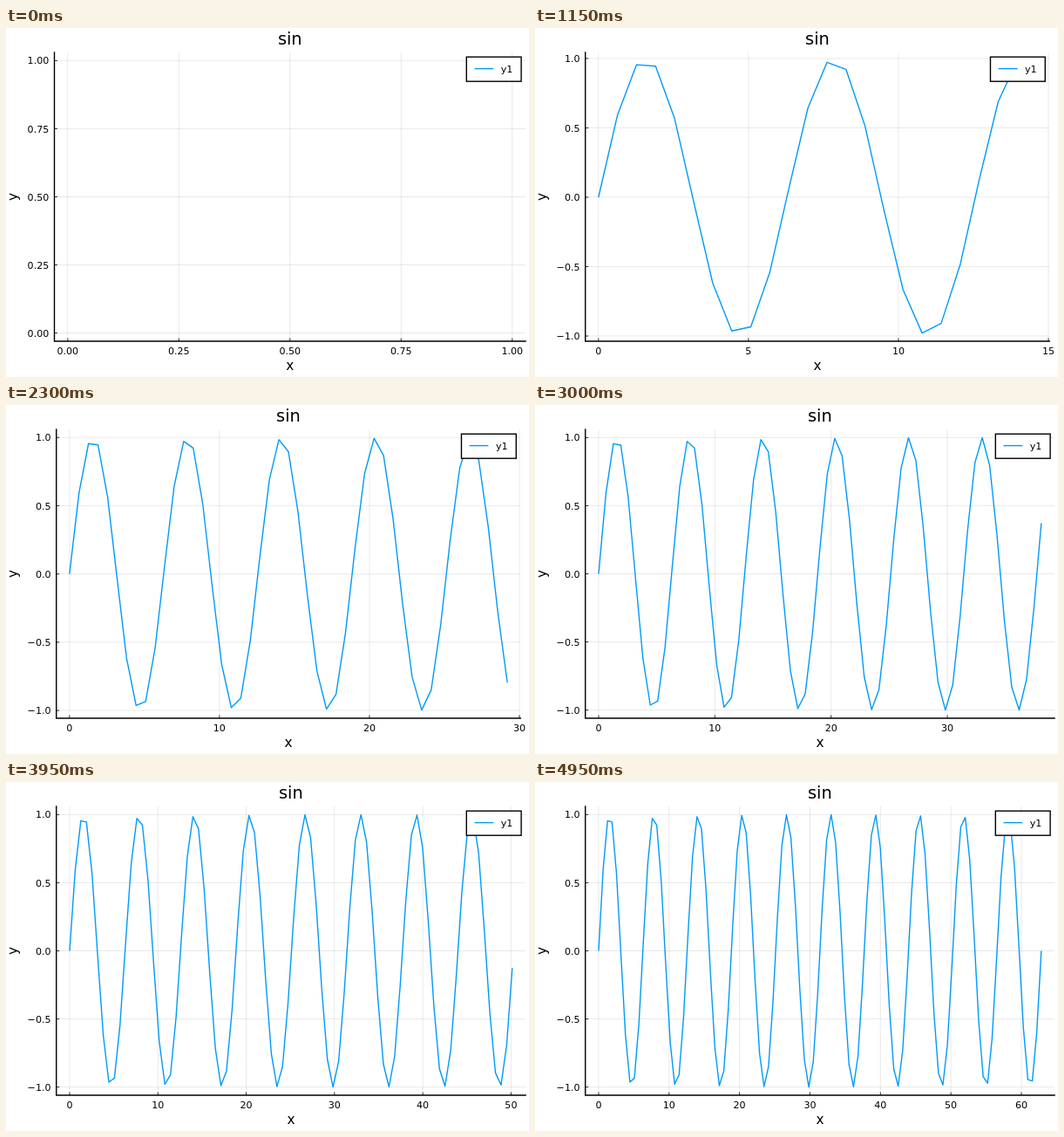
Write an HTML page that moves like this. It is 600x400 px and loops after 5 s.

```html
<!DOCTYPE html>
<html lang="en">
<head>
<meta charset="utf-8">
<title>sin</title>
<style>
  html, body { margin: 0; width: 100%; height: 100%; overflow: hidden; background: #fff; }
  svg { display: block; width: 600px; height: 400px; }
  text { font-family: "DejaVu Sans", sans-serif; fill: #000; }
  .tick { font-size: 11.1px; }
  .guide { font-size: 15.3px; }
  .title { font-size: 19.4px; }
  .mid { text-anchor: middle; }
  .end { text-anchor: end; }
  path { fill: none; }
  #grid { stroke: #000; stroke-opacity: .1; stroke-width: .9; }
  #marks { stroke: #000; stroke-width: .8; }
  #axes { stroke: #000; stroke-width: 1.4; stroke-linecap: square; }
  .line { stroke: #009afa; stroke-width: 1.4; stroke-linejoin: round; }
</style>
</head>
<body>
<svg viewBox="0 0 600 400">
  <rect width="600" height="400" fill="#fff"/>
  <path id="grid"/>
  <path id="axes"/>
  <path id="marks"/>
  <path id="curve" class="line"/>
  <g id="labels"></g>
  <text id="title" class="title mid" y="19">sin</text>
  <text id="xname" class="guide mid" y="392.3">x</text>
  <text class="guide mid" transform="translate(13.4 193.5) rotate(-90)">y</text>
  <g id="legend">
    <rect x="528.3" y="33.2" width="62.8" height="28" fill="#fff" stroke="#000" stroke-width="1.4"/>
    <path class="line" d="M537.5 46.6H559.3"/>
    <text class="tick" x="567.8" y="50.6">y1</text>
  </g>
</svg>
<script>
const FRAME = 50, COUNT = 100;
const TOP = 28, BOTTOM = 359, RIGHT = 596.06, FONT = 11.1;
const DX = 20 * Math.PI / (COUNT - 1);
const NICE = [[5, .9], [3, .2], [2.5, .5], [2, .7], [1, 1]];
const $ = id => document.getElementById(id);
const f = v => v.toFixed(2);

// Limits widened by 3 % on both sides
function limits(lo, hi) {
  if (hi <= lo) hi = lo + 1;
  const pad = .03 * (hi - lo);
  return [lo - pad, hi + pad];
}

// Picks the step that best balances tick count, coverage and roundness
function ticks([lo, hi]) {
  const span = hi - lo;
  let best = -Infinity, result = [];
  for (let z = Math.ceil(Math.log10(span)); z > -3; z--) {
    for (const [q, nice] of NICE) {
      const step = q * 10 ** z;
      const a = Math.ceil(lo / step), b = Math.floor(hi / step), n = b - a + 1;
      if (n < 4 || n > 8) continue;
      const score = .25 * (1 - Math.abs(n - 5) / 5) + .5 * span / ((n - 1) * step) + .25 * nice;
      if (score <= best + 1e-9) continue;
      best = score;
      let d = 0;
      while (Math.abs(step * 10 ** d - Math.round(step * 10 ** d)) > 1e-6) d++;
      result = Array.from({ length: n }, (_, i) => {
        const v = (a + i) * step;
        return { v, text: (v < 0 ? "\u2212" : "") + Math.abs(v).toFixed(d) };
      });
    }
  }
  return result;
}

// Text width from the font's advances
function width(text) {
  let w = 0;
  for (const c of text) w += c === "." ? .318 : c === "\u2212" ? .838 : .636;
  return w * FONT;
}

function label(x, y, cls, text) {
  return `<text class="tick ${cls}" x="${f(x)}" y="${f(y)}">${text}</text>`;
}

function draw(k) {
  const pts = Array.from({ length: k + 1 }, (_, i) => [i * DX, Math.sin(i * DX)]);
  const ys = pts.map(p => p[1]);
  const xl = limits(0, k * DX), yl = limits(Math.min(...ys), Math.max(...ys));
  const xt = ticks(xl), yt = ticks(yl);

  const left = 30.8 + Math.max(...yt.map(t => width(t.text)));
  let right = RIGHT;
  const px = v => left + (v - xl[0]) / (xl[1] - xl[0]) * (right - left);
  const py = v => BOTTOM - (v - yl[0]) / (yl[1] - yl[0]) * (BOTTOM - TOP);

  // Make room when the last x label would stick out
  const last = xt[xt.length - 1];
  const over = px(last.v) + width(last.text) / 2 - RIGHT;
  if (over > .5) right -= over;

  let grid = "", marks = "", labels = "";
  for (const t of xt) {
    const x = px(t.v);
    grid += `M${f(x)} ${TOP}V${BOTTOM}`;
    marks += `M${f(x)} ${BOTTOM}v-3.5`;
    labels += label(x, 374, "mid", t.text);
  }
  for (const t of yt) {
    const y = py(t.v);
    grid += `M${f(left)} ${f(y)}H${f(right)}`;
    marks += `M${f(left)} ${f(y)}h3.5`;
    labels += label(left - 6.2, y + 4.1, "end", t.text);
  }
  $("grid").setAttribute("d", grid);
  $("marks").setAttribute("d", marks);
  $("labels").innerHTML = labels;
  $("axes").setAttribute("d", `M${f(left)} ${TOP}V${BOTTOM}H${f(right)}`);
  $("curve").setAttribute("d", k ? "M" + pts.map(p => f(px(p[0])) + " " + f(py(p[1]))).join("L") : "");

  const mid = f((left + right) / 2);
  $("title").setAttribute("x", mid);
  $("xname").setAttribute("x", mid);
  $("legend").setAttribute("transform", `translate(${f(right - RIGHT)} 0)`);
}

let shown = -1;
function tick(now) {
  const k = Math.floor(now / FRAME) % COUNT;
  if (k !== shown) draw(shown = k);
  requestAnimationFrame(tick);
}
draw(0);
requestAnimationFrame(tick);
</script>
</body>
</html>
```
